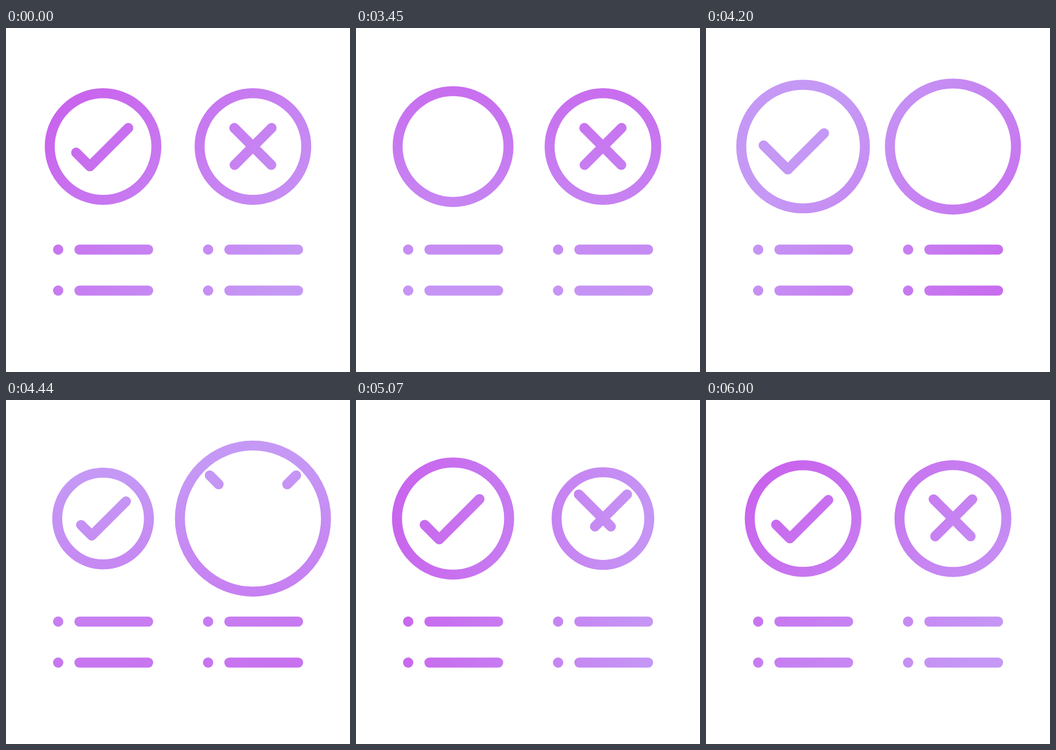
An HTML page with a canvas that plays this animation: 600 px wide and 600 px high, repeating every 6.03 s.

```html
<!DOCTYPE html>
<html lang="en">
<head>
<meta charset="utf-8">
<title>Pros and cons</title>
<style>
  html, body { margin: 0; width: 100%; height: 100%; overflow: hidden; background: #fff; }
  canvas { display: block; width: 600px; height: 600px; }
</style>
</head>
<body>
<canvas id="stage" width="600" height="600"></canvas>
<script>
const ctx = document.getElementById('stage').getContext('2d');
const LOOP = 6030, STROKE = 17.4, RADIUS = 93, ERASE = 340;

// Ring growth: dip, swell, shrink, settle
const PULSE = [[0, 0], [200, -10], [885, 38], [1540, -15.5], [1935, 5.2], [2450, 0]];

// Each mark is a dash on a longer path; tail and front are its resting ends in x units
const tick = {
  x: 169.3, start: 3008, gain: 1.08, tail: 23, front: 114,
  leave: 3000, enter: 3684, half: 390, bounce: 0.15,
  paths: [[[67, -55.5], [-23, 34.5], [-83, -25.5]]]
};
const cross = {
  x: 430.7, start: 3620, gain: 0.93, tail: 22.5, front: 87,
  leave: 3620, enter: 4370, half: 365, bounce: 0.44,
  paths: [-1, 1].map(s => [[55 * s, -55], [-65 * s, 65]])
};

const clamp = v => Math.min(1, Math.max(0, v));
const ease = u => (1 - Math.cos(Math.PI * u)) / 2;
const mix = (a, b, u) => a + (b - a) * u;

function pulse(t) {
  const i = PULSE.findIndex(step => t < step[0]);
  if (i < 1) return 0;
  const [t0, a] = PULSE[i - 1], [t1, b] = PULSE[i];
  return mix(a, b, ease((t - t0) / (t1 - t0)));
}

// Damped swing: each half period turns back at a fixed share of the last reach
function swing(reach, bounce, halves) {
  const n = Math.floor(halves);
  const peak = reach * (-bounce) ** n;
  return mix(peak, -bounce * peak, ease(halves - n));
}

function paint(t) {
  const u = clamp((t - 3000) / 2470);
  const angle = Math.PI * (-0.75 + u + ease(u));
  const dx = Math.cos(angle), dy = Math.sin(angle);
  const g = ctx.createLinearGradient(345 + 305 * dx, 310 + 305 * dy, 345 - 190 * dx, 310 - 190 * dy);
  g.addColorStop(0, '#c963ed');
  g.addColorStop(1, '#c598f5');
  return g;
}

function line(points) {
  ctx.beginPath();
  points.forEach(([x, y]) => ctx.lineTo(x, y));
  ctx.stroke();
}

function disc(x, y, r) {
  ctx.beginPath();
  ctx.arc(x, y, r, 0, 2 * Math.PI);
}

// Part of a polyline between two positions, measured in x
function cut(path, from, to) {
  const out = [];
  let start = 0;
  for (let i = 1; i < path.length; i++) {
    const [x0, y0] = path[i - 1], [x1, y1] = path[i];
    const len = Math.abs(x1 - x0);
    const a = Math.max(from, start), b = Math.min(to, start + len);
    if (a < b) {
      for (const q of [a, b]) {
        const k = (q - start) / len;
        out.push([mix(x0, x1, k), mix(y0, y1, k)]);
      }
    }
    start += len;
  }
  return out;
}

function drawBadge(b, t) {
  const y = 206.8, r = RADIUS + b.gain * pulse(t - b.start), scale = r / RADIUS;
  disc(b.x, y, r);
  ctx.stroke();

  let { tail, front } = b;
  if (t < b.enter) {
    tail = mix(tail, front, clamp((t - b.leave) / ERASE));
  } else {
    const shift = swing(-front, b.bounce, (t - b.enter) / b.half);
    tail = Math.max(0, tail + shift);
    front += shift;
  }
  if (front <= tail) return;
  for (const path of b.paths) {
    line(cut(path, tail, front).map(([px, py]) => [b.x + px * scale, y + py * scale]));
  }
}

function draw(t) {
  ctx.clearRect(0, 0, 600, 600);
  ctx.strokeStyle = ctx.fillStyle = paint(t);
  ctx.lineWidth = STROKE;
  ctx.lineCap = ctx.lineJoin = 'round';
  drawBadge(tick, t);
  drawBadge(cross, t);
  for (const x of [91, 352.5]) {
    for (const y of [386.5, 458]) {
      disc(x, y, 9);
      ctx.fill();
      line([[x + 37, y], [x + 157, y]]);
    }
  }
}

const began = performance.now();
function play() {
  draw((performance.now() - began) % LOOP);
  requestAnimationFrame(play);
}
play();
</script>
</body>
</html>
```
